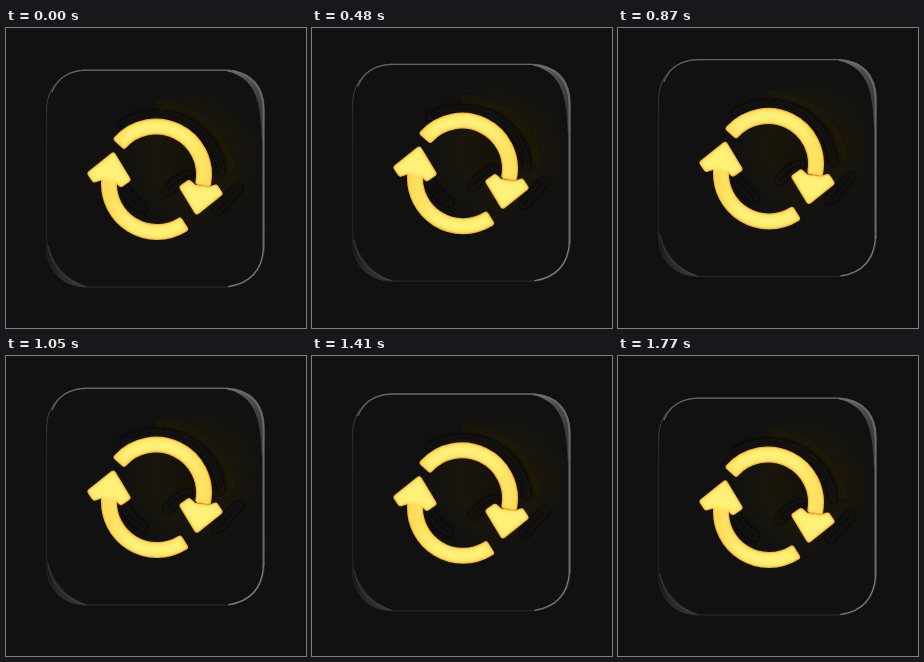
An HTML page for the animation above (1.8 s loop, 300x300 px).

```html
<!DOCTYPE html>
<html lang="en">
<head>
<meta charset="utf-8">
<title>Refresh</title>
<style>
  html, body { margin: 0; width: 100%; height: 100%; overflow: hidden; background: #111; }
  svg { display: block; width: 100vw; height: 100vh; }
  .line path, .line rect { fill: none; stroke-linecap: round; }
  .solid { stroke-linejoin: round; }
</style>
</head>
<body>
<svg viewBox="0 0 300 300">
  <defs>
    <radialGradient id="glow" gradientUnits="userSpaceOnUse" cx="188" cy="130" r="74">
      <stop offset="0" stop-color="#14110a"/>
      <stop offset=".55" stop-color="#1a160c"/>
      <stop offset="1" stop-color="#111"/>
    </radialGradient>
    <linearGradient id="shine" x1="0" y1="0" x2="1" y2=".7">
      <stop offset="0" stop-color="#777"/>
      <stop offset=".5" stop-color="#4c4c4c"/>
      <stop offset="1" stop-color="#363636"/>
    </linearGradient>
    <linearGradient id="corner" x1="0" y1="0" x2="1" y2="1">
      <stop offset="0" stop-color="#151515"/>
      <stop offset="1" stop-color="#393939"/>
    </linearGradient>
    <linearGradient id="rim" gradientUnits="userSpaceOnUse" x1="0" y1="42" x2="0" y2="259">
      <stop offset="0" stop-color="#606060"/>
      <stop offset=".25" stop-color="#2c2c2c"/>
      <stop offset=".75" stop-color="#282828"/>
      <stop offset="1" stop-color="#303030"/>
    </linearGradient>
    <linearGradient id="core" gradientUnits="userSpaceOnUse" x1="95" y1="0" x2="206" y2="0">
      <stop offset="0" stop-color="#ffd650"/>
      <stop offset=".25" stop-color="#fff078"/>
      <stop offset=".75" stop-color="#fff078"/>
      <stop offset="1" stop-color="#ffdc58"/>
    </linearGradient>
    <filter id="soft" x="-20%" y="-20%" width="140%" height="140%"><feGaussianBlur stdDeviation=".5"/></filter>
    <filter id="blend" x="-20%" y="-20%" width="140%" height="140%"><feGaussianBlur stdDeviation="1.6"/></filter>
    <filter id="haze" x="-30%" y="-30%" width="160%" height="160%"><feGaussianBlur stdDeviation="2.5"/></filter>

    <path id="arcs"/>
    <path id="head" d="M84.500 145.500L107 127.500L121.500 151.500L115 156L110 151.500L95 149.500L88.500 151.500Z"/>
    <g id="heads">
      <use href="#head"/>
      <use href="#head" transform="rotate(180 149 155.500)"/>
    </g>
  </defs>

  <g id="card">
    <rect x="40.500" y="41.500" width="218" height="218" rx="38" fill="#111"/>
    <rect x="80" y="50" width="176" height="160" fill="url(#glow)"/>
    <g class="line" filter="url(#haze)">
      <path d="M118 95A65 65 0 0 1 215 143" stroke="#0c0b08" stroke-width="7"/>
      <path d="M150 76A75 75 0 0 1 226 142" stroke="#211b0e" stroke-width="3"/>
      <path d="M118 160Q124 172 136 180M182 148Q171 151 162 163M212 182L232 160" stroke="#0b0a08" stroke-width="9"/>
    </g>

    <!-- Glass edges -->
    <g class="solid" filter="url(#soft)">
      <path d="M220 42.500C245 43 258.500 56 258.500 82C258.500 96 258 104 256 112C255 98 255 88 252 75C248 59 240 48 220 42.500Z" fill="url(#shine)"/>
      <path d="M41 212C41 243 55 259 82 259C60 252 47 236 41 212Z" fill="url(#corner)"/>
    </g>
    <g class="line">
      <rect x="40.700" y="42" width="217.600" height="217" rx="38" stroke="url(#rim)" stroke-width=".9"/>
      <path d="M46 64C52 50 62 43 80 42.300H222" stroke="#666" stroke-width="1.100"/>
      <path d="M222 42.800C244 44 257.500 58 257.500 82V220" stroke="#686868" stroke-width="2"/>
      <path d="M257.500 220C256 243 244 255 223 258.500" stroke="#7c7c7c" stroke-width="1.300"/>
      <path d="M42 218C46 239 58 252 78 258" stroke="#484848" stroke-width=".8"/>
    </g>

    <!-- Refresh arrows -->
    <g class="solid" filter="url(#soft)">
      <g fill="#efb43a" stroke="#efb43a" stroke-width="6">
        <use href="#arcs"/>
        <use href="#heads"/>
      </g>
      <g fill="#ffdc58" stroke="#ffdc58" stroke-width="3.500">
        <use href="#arcs"/>
        <use href="#heads"/>
      </g>
    </g>
    <g class="solid" filter="url(#blend)">
      <use href="#arcs" fill="url(#core)"/>
      <use href="#heads" fill="#fff078" stroke="#fff078" stroke-width="2"/>
    </g>
  </g>
</svg>
<script>
  const LOOP = 1800, STEP = 30, LIFT = 10.6;
  const INNER = 43, OUTER = 53;
  const card = document.getElementById("card");

  // Ring segment clockwise between two angles in degrees.
  function segment(cx, cy, from, to) {
    const point = (radius, angle) => {
      const a = angle * Math.PI / 180;
      return `${cx + radius * Math.cos(a)} ${cy + radius * Math.sin(a)}`;
    };
    return `M${point(OUTER, from)}A${OUTER} ${OUTER} 0 0 1 ${point(OUTER, to)}` +
      `L${point(INNER, to)}A${INNER} ${INNER} 0 0 0 ${point(INNER, from)}Z`;
  }

  function draw(now) {
    const time = Math.floor((now % LOOP) / STEP) * STEP;
    const rise = LIFT * (1 - Math.cos(2 * Math.PI * time / LOOP)) / 2;
    card.setAttribute("transform", `translate(0 ${-rise.toFixed(3)})`);
    requestAnimationFrame(draw);
  }

  document.getElementById("arcs").setAttribute("d",
    segment(150, 146.5, -138, 10) + segment(151, 156, 58, 185));
  draw(0);
</script>
</body>
</html>
```
